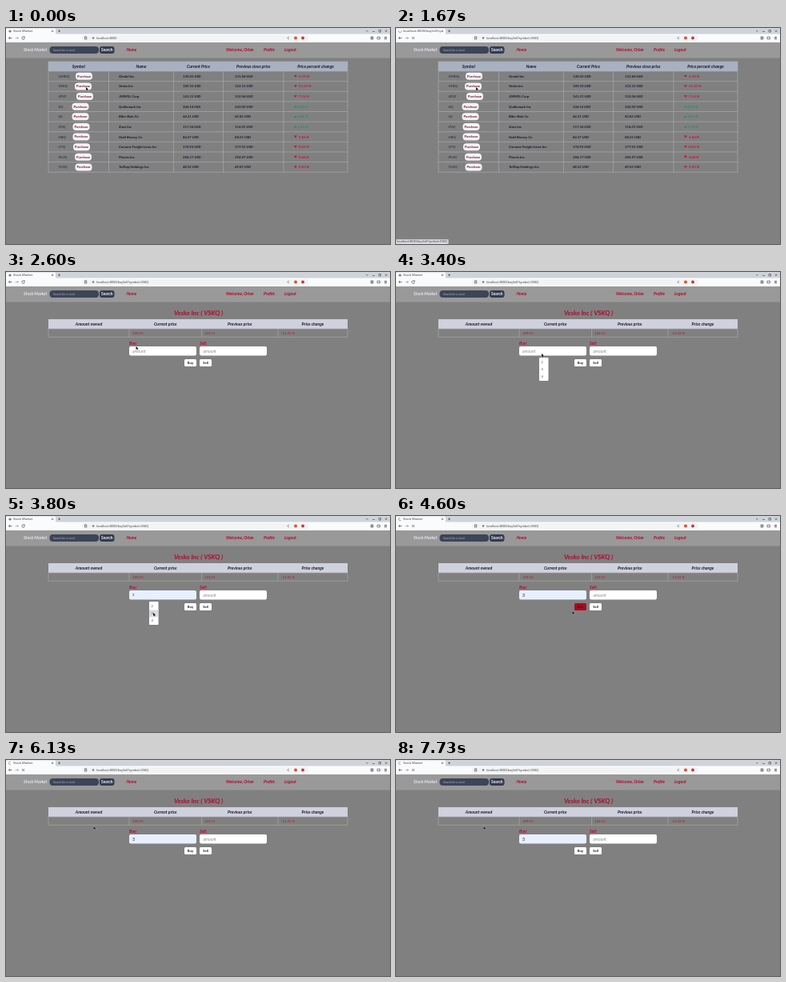
These frames come from a looping animation (480x270 px, 8 s). An HTML page with a canvas:

```html
<!DOCTYPE html>
<html lang="en">
<head>
<meta charset="utf-8">
<title>Stock Market</title>
<style>
  html, body { margin: 0; width: 100%; height: 100%; overflow: hidden; background: #808080; }
  canvas { display: block; width: 480px; height: 270px; }
</style>
</head>
<body>
<canvas id="stage" width="480" height="270"></canvas>
<script>
const ctx = document.getElementById('stage').getContext('2d');
const LOOP = 8000;
const UI = '"Open Sans", sans-serif', PAGE = 'Lato, sans-serif';
const RED = '#b0082c', INK = '#15172a';
const LINK = 'localhost:8000/buySell?symbol=VSKQ';

// Moments of the recorded session, in ms.
const T = { hover: 70, load: 260, page: 1730, loaded: 2060, list: 3330, preview: 3540,
            pick: 3870, overBuy: 4330, submit: 4470, leaveBuy: 4730 };

// symbol, button x, company, current price, previous close
const stocks = [
  ['OMDQ', 87, 'Omdel Inc', 130.03, 131.86],
  ['VSKQ', 86, 'Vesko Inc', 109.10, 123.15],
  ['JRVZ', 88, 'JORVEL Corp', 141.21, 152.06],
  ['ZQ', 82.5, 'Quillomark Inc', 346.16, 343.00],
  ['QJ', 82.5, 'Bibo-Bola Co', 64.21, 63.82],
  ['ZVQ', 83.5, 'Zuvo Inc', 117.56, 116.25],
  ['HBQ', 83.5, 'Hald Brenvy Co', 86.37, 88.01],
  ['CFQ', 84, 'Corvane Freight Lines Inc', 176.93, 177.01],
  ['PLVQ', 86, 'Plovrix Inc', 284.17, 294.97],
  ['TLDQ', 86.5, 'TolDap Holdings Inc', 68.32, 69.03],
];

// time, x, y
const mousePath = [
  [0, 100, 74], [2270, 100, 74], [2400, 132, 83], [2600, 162.5, 93], [2870, 162.5, 93],
  [2930, 163, 94], [3070, 163, 94], [3270, 182, 100], [3400, 182, 102], [3600, 183, 113],
  [3800, 184, 121], [3900, 184, 121], [4150, 208, 118], [4400, 230, 114], [4530, 229, 115],
  [4600, 220.5, 119], [4780, 205, 118], [4930, 109.5, 83],
];

function mouseAt(t) {
  const i = mousePath.findIndex(p => p[0] > t);
  if (i < 0) return mousePath.at(-1).slice(1);
  const [t0, x0, y0] = mousePath[i - 1], [t1, x1, y1] = mousePath[i];
  const k = (t - t0) / (t1 - t0);
  return [x0 + (x1 - x0) * k, y0 + (y1 - y0) * k];
}

function text(s, x, y, size, color, style = 'italic bold', align = 'left', family = PAGE) {
  ctx.font = `${style} ${size}px ${family}`;
  ctx.fillStyle = color;
  ctx.textAlign = align;
  ctx.textBaseline = 'alphabetic';
  ctx.fillText(s, x, y + size * 0.35);
}

function ui(s, x, y, size = 3.7, color = '#33363b') {
  text(s, x, y, size, color, 'normal', 'left', UI);
}

function box(x, y, w, h, color, radius = 0) {
  ctx.fillStyle = color;
  ctx.beginPath();
  ctx.roundRect(x, y, w, h, radius);
  ctx.fill();
}

function dot(x, y, r, color) {
  box(x - r, y - r, 2 * r, 2 * r, color, r);
}

function stroke(d, color = '#4b4f55', width = 0.7) {
  ctx.strokeStyle = color;
  ctx.lineWidth = width;
  ctx.stroke(new Path2D(d));
}

function grid(xs, ys, color) {
  const left = xs[0], right = xs.at(-1), top = ys[0], bottom = ys.at(-1);
  stroke(xs.map(x => `M${x} ${top}V${bottom}`).join('') +
         ys.map(y => `M${left} ${y}H${right}`).join(''), color, 0.6);
}

function headings(labels, xs, y) {
  labels.forEach((label, i) =>
    text(label, (xs[i] + xs[i + 1]) / 2, y, 5.2, INK, 'italic bold', 'center'));
}

function button(label, x, y, w, h, fill, color, radius) {
  box(x, y, w, h, fill, radius);
  text(label, x + w / 2, y + h / 2, 4.2, color, 'bold', 'center');
}

function drawBrowser(t, loading) {
  box(0, 0, 480, 8, '#cfd4da');
  box(0, 0.5, 62, 8, '#fafbfc', 1.5);
  box(0, 7.5, 480, 10.5, '#fafbfc');
  box(95, 9, 283, 7, '#f1f3f4', 3);

  if (loading) {
    const a = -t / 1600 * 2 * Math.PI;
    ctx.strokeStyle = '#6d747c';
    ctx.lineWidth = 0.7;
    ctx.beginPath();
    ctx.arc(5, 4, 1.6, a, a + 4);
    ctx.stroke();
  } else {
    dot(5, 4, 1.6, '#777c82');
  }
  const opening = t >= T.load && t < T.page;
  ui(opening ? 'localhost:8000/buySell?sy' : 'Stock Market', 9, 3.8, 4);
  stroke('M57 2.8l2 2m0-2l-2 2M65 3.8h3m-1.5-1.5v3');
  stroke('M450 3l1.3 1.3L452.600 3M458 4.500h3M466 2.500h2.500v2.500h-2.500zM474 2.500l2.400 2.400m0-2.400l-2.400 2.400');
  stroke('M7.500 12.500h-4m1.600-1.600l-1.600 1.600l1.600 1.600');
  stroke('M11.500 12.500h4m-1.600-1.600l1.600 1.600l-1.600 1.600', '#9a9ea3');
  stroke(loading ? 'M20 11l3 3m0-3l-3 3' : 'M22.900 11.400A1.800 1.800 0 1 0 23.300 13M23.300 10.500v1.500h-1.500');
  stroke('M98.500 10.800h2.200v3.400l-1.100-.9l-1.100 .9z');
  dot(109, 12.5, 1.2, '#70757b');
  ui(t < T.load ? 'localhost:8000' : LINK, 113, 12.4, 3.75);
  stroke('M354 11l-2.500 1.500l2.500 1.500', '#777');
  dot(362, 12.4, 2, '#e5502e');
  dot(371, 12.4, 2, '#c93a42');
  stroke('M456 11h3v3h-3zM457.500 11v3M464 11.200h3.500v2.600h-3.500zM473 11.300h3m-3 1.300h3m-3 1.300h3');
}

function drawNav() {
  box(0, 18, 480, 19.5, '#999999');
  text('Stock Market', 22, 27.5, 5.25, '#e4e5ef');
  box(54.500, 23, 61.500, 9, '#3c4458', 4);
  text('Search for a stock', 59, 27.5, 3.7, '#a9afbf', 'italic');
  box(117, 23, 18.500, 9, '#343b50', 3);
  text('Search', 126.300, 27.5, 4.9, '#f0f1f6', 'bold', 'center');
  text('Home', 150.500, 27.5, 5.1, RED);
  text('Welcome, Orlan', 275, 27.5, 5.15, RED);
  text('Profile', 322, 27.5, 5.15, RED);
  text('Logout', 348, 27.5, 5.15, RED);
}

function drawMarket() {
  const xs = [53, 128.5, 209.5, 271.5, 347, 427], rowHeight = 12.62;
  box(53, 42, 374, 12, '#a9b1c1');
  headings(['Symbol', 'Name', 'Current Price', 'Previous close price', 'Price percent change'], xs, 48);
  grid(xs, [42, ...Array.from({ length: 11 }, (_, i) => 54 + i * rowHeight)], '#adafb5');

  stocks.forEach(([symbol, bx, name, price, previous], i) => {
    const y = 60.3 + i * rowHeight, change = (price / previous - 1) * 100;
    const up = change > 0, color = up ? '#0b9860' : '#d0062d';
    text(symbol, 65.5, y, 4.5, '#35384a');
    button('Purchase', bx, y - 4.5, 21, 9, '#f5f3f6', '#6a0c22', 4);
    text(name, 141, y, 4.5, INK);
    text(price.toFixed(2) + ' USD', 221, y, 4.3, INK);
    text(previous.toFixed(2) + ' USD', 286, y, 4.3, INK);
    ctx.fillStyle = color;
    ctx.fill(new Path2D(up ? `M359.800 ${y + 1.2}h4l-2-2.600z` : `M359.800 ${y - 1.4}h4l-2 2.600z`));
    text(change.toFixed(2) + ' %', 364.5, y, 4.4, color);
  });
}

function drawTrade(t) {
  text('Vesko Inc ( VSKQ )', 240.5, 50.8, 8, RED, 'italic bold', 'center');
  const xs = [53, 154, 244.5, 340, 427];
  box(53, 59, 374, 12, '#d0d1de');
  headings(['Amount owned', 'Current price', 'Previous price', 'Price change'], xs, 65.2);
  grid(xs, [71, 81.3], '#abaea6');
  text('109.10', 158, 76.3, 4.3, '#a3122f', 'italic');
  text('123.15', 248, 76.3, 4.3, '#a3122f', 'italic');
  text('-11.41 %', 344, 76.3, 4.3, '#a3122f', 'italic');

  text('Buy:', 154, 89.5, 5.2, RED);
  text('Sell:', 242, 89.5, 5.2, RED);
  const filled = t >= T.preview;
  box(154, 93, 84, 11.5, filled ? '#e8f0fe' : '#ffffff', 2);
  box(242, 93, 84, 11.5, '#ffffff', 2);
  if (filled) text('3', 158, 99, t < T.pick ? 3.7 : 5.2, INK, 'normal');
  else text('amount', 158, 99, 5.1, '#8b8d93', 'italic');
  text('amount', 246.5, 99, 5.1, '#8b8d93', 'italic');

  const hot = t >= T.overBuy && t < T.leaveBuy;
  button('Buy', 223, 109, 15, 9, hot ? '#ac0820' : '#ffffff', hot ? '#4d0712' : '#151515', 1.5);
  button('Sell', 242, 109, 15, 9, '#ffffff', '#151515', 1.5);

  if (t >= T.list && t < T.pick) {
    box(179, 107, 11.5, 29, '#ffffff', 0.8);
    if (filled) box(179, t < 3700 ? 108.5 : 117.5, 11.5, 8.800, '#d9dbde');
    ['2', '3', '4'].forEach((n, i) => ui(n, 181.5, 113 + i * 9, 4));
  }
}

function drawMouse(t) {
  const [x, y] = mouseAt(t);
  const arrow = new Path2D(`M${x} ${y}v3.900l1-.9l.8 1.600l.7-.4l-.7-1.500h1.300z`);
  ctx.strokeStyle = '#e8e8e8';
  ctx.lineWidth = 0.6;
  ctx.stroke(arrow);
  ctx.fillStyle = '#111';
  ctx.fill(arrow);
}

function draw(t) {
  box(0, 0, 480, 270, '#808080');
  drawNav();
  if (t < T.page) drawMarket();
  else drawTrade(t);
  drawBrowser(t, (t >= T.load && t < T.loaded) || t >= T.submit);
  if (t >= T.hover && t < T.page) {
    box(0, 264.300, 65.5, 5.700, '#d9dce0');
    ui(LINK, 1, 267.2, 3.65);
  }
  drawMouse(t);
}

const start = performance.now();
(function frame() {
  draw((performance.now() - start) % LOOP);
  requestAnimationFrame(frame);
})();
</script>
</body>
</html>
```
